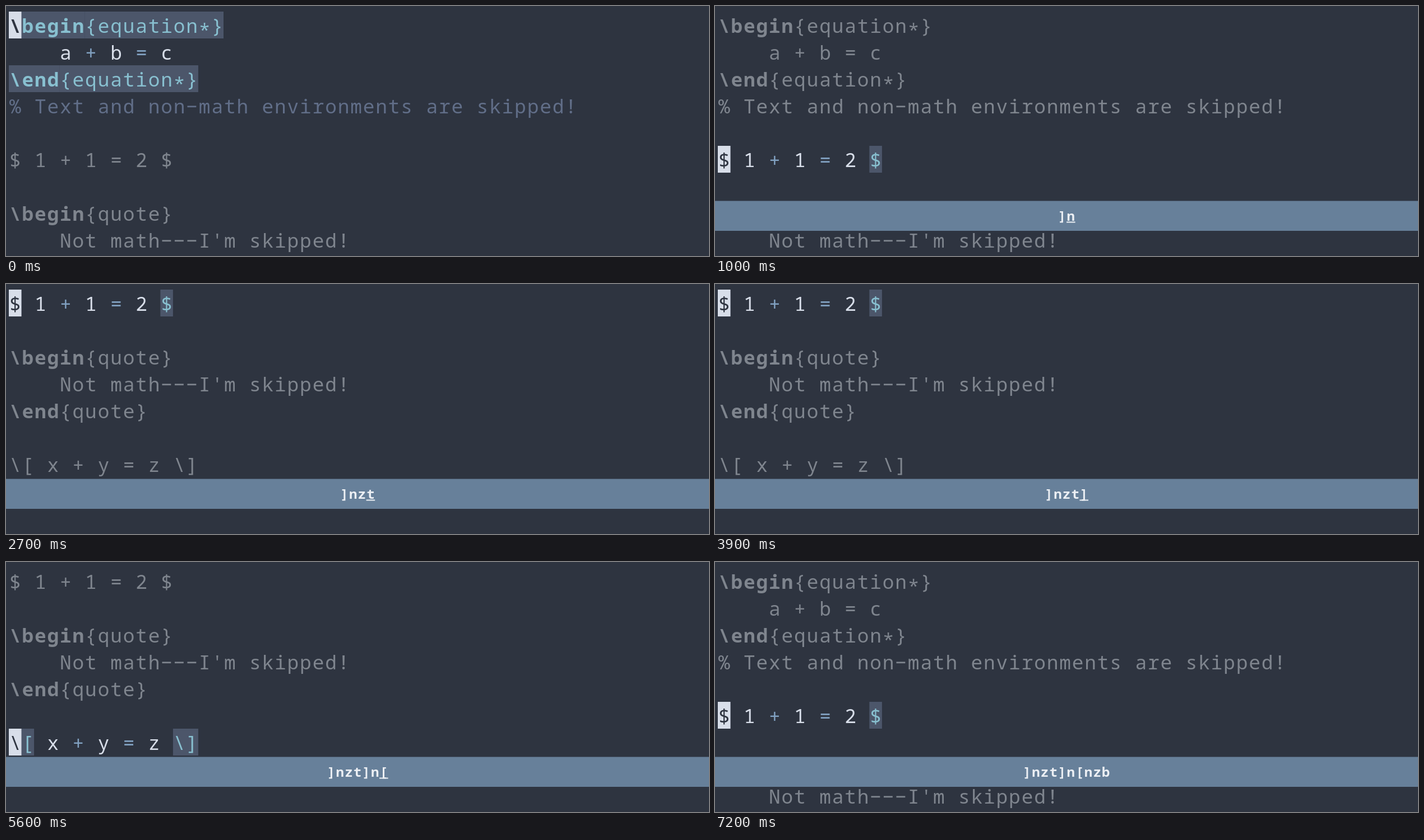
An HTML page for the animation above (8 s loop, 1254 px wide and 447 px high).

```html
<!DOCTYPE html>
<html lang="en">
<head>
<meta charset="utf-8">
<title>Jumping between math environments</title>
<style>
  html, body { margin: 0; width: 100%; height: 100%; overflow: hidden; background: #2e3440; }
  svg { display: block; width: 100vw; height: 100vh; }
  text { font-family: "Noto Sans Mono", "DejaVu Sans Mono", monospace; text-anchor: middle; }
</style>
</head>
<body>
<svg id="stage" viewBox="0 0 1254 447">
  <rect width="1254" height="447" fill="#2e3440"/>
  <g id="editor"></g>
  <g id="keys"></g>
</svg>
<script>
const LOOP = 8000;
const CELL = 22.53, ROW = 48, LEFT = 5, TOP = 10, SIZE = 34.5;
const KEY = 15.6, KEY_LINGER = 200;
const COLOR = {
  text: '#d8dee9', dim: '#7f858e', delim: '#88c0d0', op: '#81a1c1', comment: '#616e88',
  cursor: '#d8dee9', cursorText: '#2e3440', mark: '#4c566a', bar: '#67809a', key: '#eceff4'
};

const DOC = [
  '\\begin{equation*}',
  '    a + b = c',
  '\\end{equation*}',
  '% Text and non-math environments are skipped!',
  '',
  '$ 1 + 1 = 2 $',
  '',
  '\\begin{quote}',
  "    Not math---I'm skipped!",
  '\\end{quote}',
  '',
  '\\[ x + y = z \\]'
];

// Each focus is the range of lines that stay lit; the cursor sits on its first cell.
const EQUATION = [0, 3], INLINE = [5, 5], DISPLAY = [11, 11];
const VIEWS = [
  { at: 0, top: 0, focus: EQUATION },
  { at: 1000, top: 0, focus: INLINE },
  { at: 2700, top: 5, focus: INLINE },
  { at: 4400, top: 5, focus: DISPLAY },
  { at: 6000, top: 5, focus: INLINE },
  { at: 7000, top: 0, focus: INLINE }
];
const PRESSES = [
  [500, ']'], [600, 'n', 600], [2000, 'z'], [2700, 't'], [3900, ']'],
  [4300, 'n'], [5600, '['], [6000, 'n'], [6600, 'z'], [7000, 'b']
];

const editor = document.getElementById('editor');
const keys = document.getElementById('keys');

function add(parent, tag, attrs, content) {
  const node = document.createElementNS('http://www.w3.org/2000/svg', tag);
  for (const name in attrs) node.setAttribute(name, attrs[name]);
  if (content) node.textContent = content;
  parent.appendChild(node);
}

function addRect(parent, x, y, width, height, fill) {
  add(parent, 'rect', { x, y, width, height, fill });
}

// One glyph per grid cell: wide dashes and a vertically centred asterisk.
function addRun(str, col, row, fill, weight) {
  const chars = [...str];
  const base = TOP + row * ROW + 38;
  add(editor, 'text', {
    x: chars.map((c, i) => (LEFT + (col + i + 0.5) * CELL).toFixed(2)).join(' '),
    y: chars.map(c => base + (c === '*' ? 8 : 0)).join(' '),
    'font-size': SIZE, 'font-weight': weight, fill
  }, str.replace(/-/g, '\u2212'));
}

function drawLine(line, row, lit, hasCursor) {
  const tokens = /(\\(?:begin|end))|(\{[^}]*\}|\$|\\[[\]])|([+=])|[^\s\\{$+=]+/g;
  const isComment = line.startsWith('%');
  for (const m of line.matchAll(tokens)) {
    const [word, command, delim, op] = m;
    const col = m.index, weight = command ? 600 : 400;
    const isDelim = command || delim;
    const fill = !lit ? COLOR.dim : isComment ? COLOR.comment
      : isDelim ? COLOR.delim : op ? COLOR.op : COLOR.text;
    const y = TOP + row * ROW;
    if (lit && isDelim) {
      addRect(editor, LEFT + col * CELL, y, word.length * CELL, ROW, COLOR.mark);
    }
    if (hasCursor && col === 0) {
      addRect(editor, LEFT, y, CELL, ROW, COLOR.cursor);
      addRun(word[0], 0, row, COLOR.cursorText, weight);
      if (word.length > 1) addRun(word.slice(1), 1, row, fill, weight);
    } else {
      addRun(word, col, row, fill, weight);
    }
  }
}

function drawEditor({ top, focus: [first, last] }) {
  editor.replaceChildren();
  DOC.slice(top, top + 9).forEach((line, row) => {
    const n = top + row;
    drawLine(line, row, n >= first && n <= last, n === first);
  });
}

function drawKeys(count, fresh) {
  keys.replaceChildren();
  if (!count) return;
  const left = 627 - count * KEY / 2;
  addRect(keys, 0, 348.5, 1254, 53.5, COLOR.bar);
  const pressed = PRESSES.slice(0, count).map(p => p[1]);
  add(keys, 'text', {
    x: pressed.map((c, i) => (left + (i + 0.5) * KEY).toFixed(2)).join(' '),
    y: 384, 'font-size': 24, 'font-weight': 700, fill: COLOR.key
  }, pressed.join(''));
  if (fresh) addRect(keys, left + (count - 1) * KEY, 385.5, KEY, 2, COLOR.key);
}

let shownView, shownKeys;
function render(t) {
  const view = VIEWS.filter(v => v.at <= t).pop();
  if (view !== shownView) drawEditor(shownView = view);

  const count = PRESSES.filter(p => p[0] <= t).length;
  const [at, , linger = KEY_LINGER] = PRESSES[count - 1] || [-LOOP];
  const fresh = t < at + linger;
  const state = count + ':' + fresh;
  if (state !== shownKeys) {
    shownKeys = state;
    drawKeys(count, fresh);
  }
}

const start = performance.now();
function tick() {
  render((performance.now() - start) % LOOP);
  requestAnimationFrame(tick);
}
render(0);
requestAnimationFrame(tick);
</script>
</body>
</html>
```
